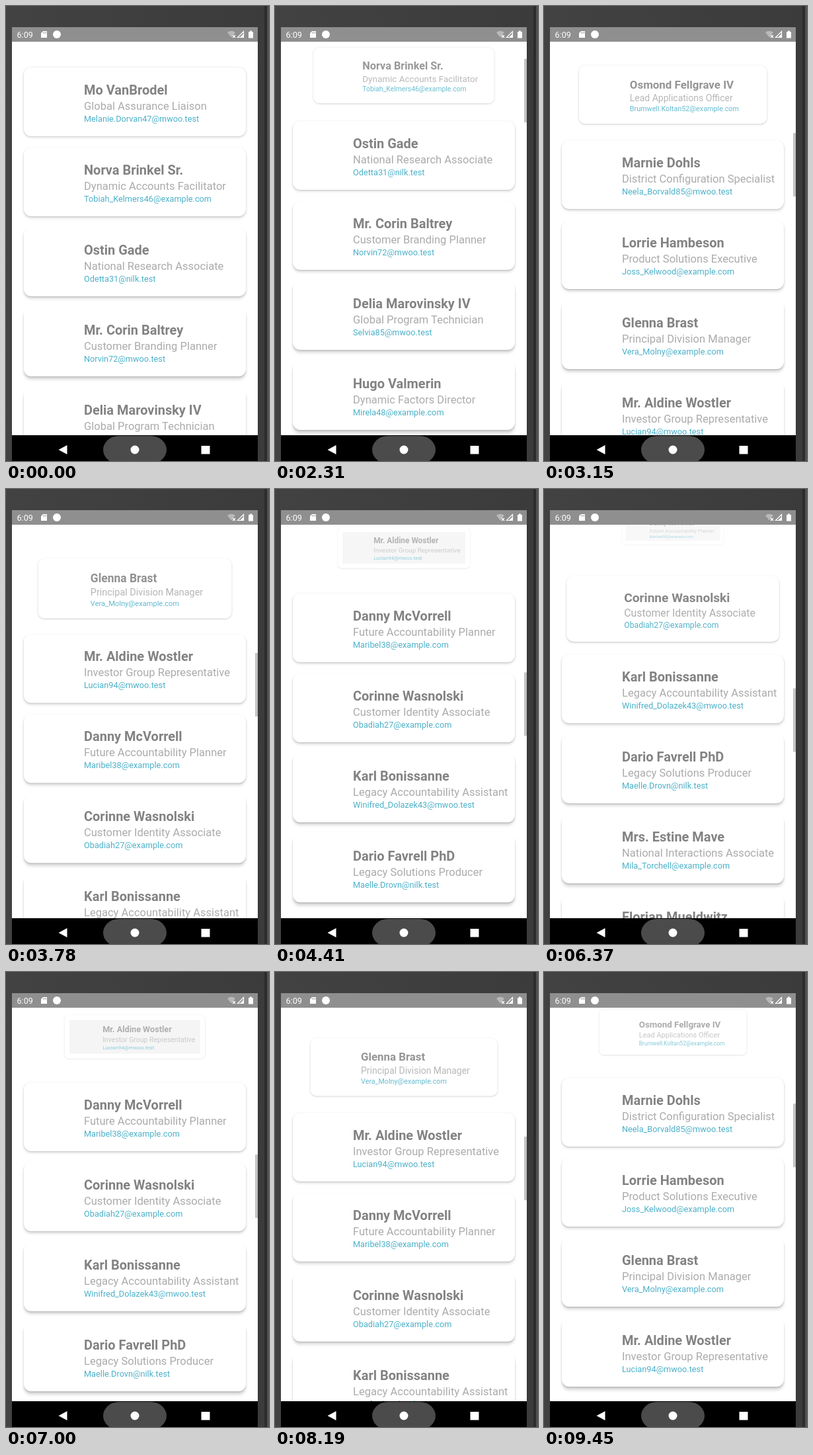
These frames come from a looping animation (398x688 px, 9.52 s). An HTML page:

```html
<!DOCTYPE html>
<html lang="en">
<head>
<meta charset="utf-8">
<title>Staff list</title>
<style>
html, body { margin: 0; width: 100%; height: 100%; overflow: hidden; }
body { position: relative; background: linear-gradient(90deg, #424242, #3b3b3b); font-family: Roboto, sans-serif; }
svg { position: absolute; left: 0; top: 0; }
#view { position: absolute; left: 9px; top: 54px; width: 372px; height: 595px; overflow: hidden; background: #fff; }
.card {
  position: absolute; left: 18px; top: 0; width: 336px; height: 104px;
  border-radius: 11px; background: #fff; white-space: nowrap;
  box-shadow: 0 calc(var(--dy) / 3) 2px rgba(0,0,0,.14), 0 var(--dy) 4px rgba(0,0,0,.15);
}
.card::before { content: ""; position: absolute; inset: 12px; background: rgba(0,0,0,.06); opacity: var(--haze); }
.card div { position: absolute; left: 91px; line-height: 20px; }
.name { top: 24px; font-size: 19.98px; font-weight: 700; color: #828282; }
.job { top: 48.6px; font-size: 16.53px; color: #ababab; }
.mail { top: 67.7px; font-size: 12.74px; color: #4bb0c8; }
#thumb { position: absolute; right: 0; top: 0; width: 4px; height: 96px; background: #c4c4c4; }
</style>
</head>
<body>
<svg width="398" height="688">
  <rect x="391" width="4" height="688" fill="#2c2c2c"/>
  <rect x="395" width="3" height="688" fill="#505050"/>
  <rect x="9" y="32" width="372" height="22" fill="#8f8f8f"/>
  <text x="16.5" y="47.6" font-size="12.6" fill="#fff">6:09</text>
  <path d="M56 38h6v10h-9v-7z" fill="#fff"/>
  <path d="M56.5 39.500v2M58.500 39.500v2M60.500 39.500v2" stroke="#8f8f8f"/>
  <circle cx="77" cy="43" r="6" fill="#fff"/>
  <path d="M335 40q6-4.500 12 0l-6 7.500z" fill="#b9b9b9"/>
  <path d="M343 44l4 4m0-4l-4 4" stroke="#fff" stroke-width="1.200"/>
  <path d="M359.500 38.500v9h-9z" fill="none" stroke="#fff" stroke-width="1.200"/>
  <path d="M359.500 42v5.500h-5.500z" fill="#fff"/>
  <path d="M367 39h2v-1.500h3V39h2v9.500h-7z" fill="#fff"/>
  <rect x="9" y="649" width="372" height="39" fill="#000"/>
  <rect x="147" y="650" width="96" height="42" rx="24" ry="21" fill="#4b4b4b"/>
  <path d="M92.500 664v14l-13-7zM295.500 665h13v12.500h-13z" fill="#fff"/>
  <circle cx="195" cy="671" r="6.500" fill="#fff"/>
</svg>
<div id="view"><div id="thumb"></div></div>
<script>
const A = "@mwoo.test", B = "@example.com", C = "@nilk.test";
const people = [
  ["Mo VanBrodel", "Global Assurance Liaison", "Melanie.Dorvan47" + A],
  ["Norva Brinkel Sr.", "Dynamic Accounts Facilitator", "Tobiah_Kelmers46" + B],
  ["Ostin Gade", "National Research Associate", "Odetta31" + C],
  ["Mr. Corin Baltrey", "Customer Branding Planner", "Norvin72" + A],
  ["Delia Marovinsky IV", "Global Program Technician", "Selvia85" + A],
  ["Hugo Valmerin", "Dynamic Factors Director", "Mirela48" + B],
  ["Nadia Torvessen", "Senior Markets Analyst", "Lorvin36" + A],
  ["Osmond Fellgrave IV", "Lead Applications Officer", "Brumwell.Koltan52" + B],
  ["Marnie Dohls", "District Configuration Specialist", "Neela_Borvald85" + A],
  ["Lorrie Hambeson", "Product Solutions Executive", "Joss_Kelwood" + B],
  ["Glenna Brast", "Principal Division Manager", "Vera_Molny" + B],
  ["Mr. Aldine Wostler", "Investor Group Representative", "Lucian94" + A],
  ["Danny McVorrell", "Future Accountability Planner", "Maribel38" + B],
  ["Corinne Wasnolski", "Customer Identity Associate", "Obadiah27" + B],
  ["Karl Bonissanne", "Legacy Accountability Assistant", "Winifred_Dolazek43" + A],
  ["Dario Favrell PhD", "Legacy Solutions Producer", "Maelle.Drovn" + C],
  ["Mrs. Estine Mave", "National Interactions Associate", "Mila_Torchell" + B],
  ["Florian Mueldwitz", "Dynamic Branding Manager", "Gideon58" + B]
];

const LOOP = 9520, STEP = 70, PITCH = 121, SHRINK = 234.9;
const view = document.getElementById("view"), thumb = document.getElementById("thumb");

const cards = people.map(person => {
  const card = document.createElement("div");
  card.className = "card";
  ["name", "job", "mail"].forEach((kind, k) => {
    const line = document.createElement("div");
    line.className = kind;
    line.textContent = person[k];
    card.append(line);
  });
  view.insertBefore(card, thumb);
  return card;
});

// Scroll offset over time: [ms, px]
const keys = [
  [0, 0], [1890, 0], [2310, 161], [3150, 858], [4410, 1387], [4620, 1391],
  [4970, 1391], [5600, 1561], [5880, 1585], [6020, 1585], [7000, 1378],
  [7490, 1320], [7770, 1320], [9030, 901], [LOOP, 901]
];
const rate = i => (keys[i + 1][1] - keys[i][1]) / (keys[i + 1][0] - keys[i][0]);

// Monotone tangent: harmonic mean of the neighbouring rates
function tangent(i) {
  if (i === 0 || i === keys.length - 1) return 0;
  const a = rate(i - 1), b = rate(i);
  return a * b > 0 ? 2 * a * b / (a + b) : 0;
}

function scrollAt(t) {
  let i = 0;
  while (t >= keys[i + 1][0]) i++;
  const [t0, p0] = keys[i], [t1, p1] = keys[i + 1];
  const d = t1 - t0, u = (t - t0) / d, v = 1 - u;
  return p0 * (1 + 2 * u) * v * v + p1 * u * u * (3 - 2 * u)
    + d * u * v * (tangent(i) * v - tangent(i + 1) * u);
}

function draw(now) {
  const t = Math.floor(now / STEP) * STEP % LOOP;
  const scroll = scrollAt(t);
  cards.forEach((card, i) => {
    const y = 39 + PITCH * i - scroll;
    const scale = Math.max(0, Math.min(1, 1 - scroll / SHRINK + i / 2));
    const shown = scale > 0 && y > -110 && y < 600;
    card.style.display = shown ? "" : "none";
    if (!shown) return;
    card.style.transform = `translateY(${y}px) scale(${scale})`;
    card.style.opacity = scale;
    card.style.setProperty("--dy", 1 + Math.max(0, y) / 110 + "px");
    card.style.setProperty("--haze", scale < 0.65 ? 1 : 0);
  });
  thumb.style.display = t >= 1960 ? "" : "none";
  thumb.style.transform = `translateY(${scroll * 0.161}px)`;
  requestAnimationFrame(draw);
}
requestAnimationFrame(draw);
</script>
</body>
</html>
```
